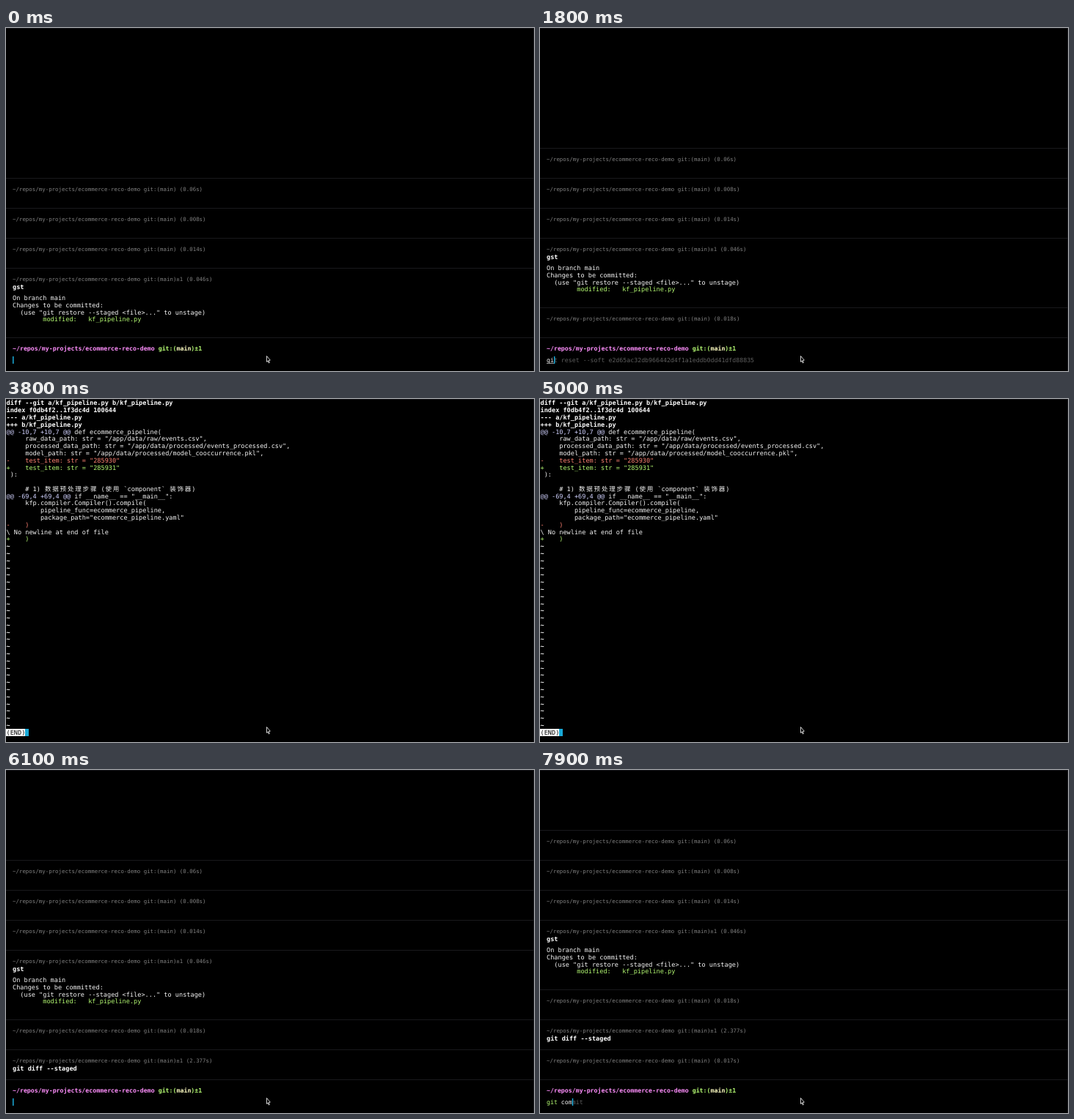
These frames come from a looping animation (720 by 469 pixels, 8 s). An HTML page with a canvas:

```html
<!DOCTYPE html>
<html lang="en">
<head>
<meta charset="utf-8">
<title>Terminal</title>
<style>
  html, body { margin: 0; width: 100%; height: 100%; overflow: hidden; background: #000; }
  canvas { display: block; }
</style>
</head>
<body>
<canvas id="stage" width="720" height="469"></canvas>
<script>
const ctx = document.getElementById('stage').getContext('2d');
const W = 720, H = 469, LOOP = 8000;
const LEFT = 9, PROMPT_TOP = 423, BLOCK_H = 41, ROW_H = 9.79;
const SMALL = 7.42, EDIT = 8.25, BODY = 8.57, ADVANCE = 0.602;
const PATH = '~/repos/my-projects/ecommerce-reco-demo';

const C = {
  text: '#f6f6f6', bold: '#ffffff', dim: '#808080', ghost: '#5e5e5e',
  path: '#ff8ffd', green: '#b4fa72', branch: '#fefdc2', del: '#ff8272',
  hunk: '#d0d1fe', arg: '#a5d5fe', rule: '#19191c', edge: '#121216',
  caret: '#19aad8', underline: '#a0a0a0'
};

const BLOCKS = [
  { time: '0.06s' },
  { time: '0.008s' },
  { time: '0.014s' },
  { time: '0.046s', dirty: true, cmd: 'gst', height: 95, out: [
    'On branch main',
    'Changes to be committed:',
    '  (use "git restore --staged <file>..." to unstage)',
    '        modified:   kf_pipeline.py'
  ] },
  { time: '0.018s' },
  { time: '2.377s', dirty: true, cmd: 'git diff --staged' },
  { time: '0.017s' }
];

const DIFF = `diff --git a/kf_pipeline.py b/kf_pipeline.py
index f0db4f2..1f3dc4d 100644
--- a/kf_pipeline.py
+++ b/kf_pipeline.py
@@ -10,7 +10,7 @@ def ecommerce_pipeline(
     raw_data_path: str = "/app/data/raw/events.csv",
     processed_data_path: str = "/app/data/processed/events_processed.csv",
     model_path: str = "/app/data/processed/model_cooccurrence.pkl",
-    test_item: str = "285930"
+    test_item: str = "285931"
 ):

     # 1) 数据预处理步骤 (使用 \`component\` 装饰器)
@@ -69,4 +69,4 @@ if __name__ == "__main__":
     kfp.compiler.Compiler().compile(
         pipeline_func=ecommerce_pipeline,
         package_path="ecommerce_pipeline.yaml"
-    )
\\ No newline at end of file
+    )`.split('\n');

const RESET = 'git reset --soft e2d65ac32db966442d4f1a1eddb0dd41dfd88835';
const STAGED = 'git diff --staged';
const COMMIT = 'git commit';

// Each event: time, finished blocks, typed length, suggested line.
const EVENTS = [
  [0, 4, 0, ''],
  [900, 5, 0, ''],
  [1700, 5, 1, RESET], [1800, 5, 2, RESET], [1900, 5, 3, RESET], [2000, 5, 4, RESET],
  [2200, 5, 5, STAGED], [2300, 5, 6, STAGED], [2400, 5, 7, STAGED], [2500, 5, 8, STAGED],
  [2700, 5, 9, STAGED], [2900, 5, 17, STAGED],
  [3800, 'pager'],
  [5900, 6, 0, ''], [6100, 6, 0, ''],
  [6900, 7, 0, ''],
  [7300, 7, 1, STAGED], [7400, 7, 2, STAGED], [7500, 7, 3, STAGED], [7600, 7, 4, STAGED],
  [7700, 7, 5, COMMIT], [7800, 7, 6, COMMIT], [7900, 7, 7, COMMIT]
];

function rect(x, y, w, h, color) {
  ctx.fillStyle = color;
  ctx.fillRect(x, y, w, h);
}

// Writes on a terminal grid; CJK characters take two cells. Returns the end x.
function write(text, x, y, size, color, bold) {
  const cell = size * ADVANCE;
  ctx.font = `${bold ? 'bold ' : ''}${size}px "DejaVu Sans Mono", "Noto Sans CJK SC", "Noto Sans CJK", monospace`;
  ctx.fillStyle = color;
  for (const ch of text) {
    const wide = ch > '\u2e80';
    if (ch !== ' ') ctx.fillText(ch, x + (wide ? cell - size / 2 : 0), y);
    x += wide ? cell * 2 : cell;
  }
  return x;
}

function drawBlock(block, top) {
  rect(0, top, W, 1, C.rule);
  write(`${PATH} git:(main)${block.dirty ? '±1' : ''} (${block.time})`, LEFT, top + 17.5, SMALL, C.dim);
  if (block.cmd) write(block.cmd, LEFT, top + 28.8, BODY, C.bold, true);
  (block.out || []).forEach((line, i) => {
    const color = line.includes('modified') ? C.green : C.text;
    write(line, LEFT, top + 44 + i * ROW_H, BODY, color);
  });
}

function drawInput(count, line, caretOn) {
  const y = 456.6, cell = EDIT * ADVANCE;
  const typed = line.slice(0, count);
  const caretX = LEFT + count * cell;
  const known = count >= 3;
  const argColor = typed.startsWith('git diff') ? C.arg : C.text;
  const x = write(typed.slice(0, 3), LEFT, y, EDIT, known ? C.green : C.text);
  write(typed.slice(3), x, y, EDIT, argColor);
  if (count && !known) rect(LEFT, 458, count * cell, 1, C.underline);
  write(line.slice(count), caretX, y, EDIT, C.ghost);
  if (caretOn) rect(caretX, 449, 1.5, 10, C.caret);
}

function drawShell(blocks, count, line, caretOn) {
  let top = PROMPT_TOP;
  rect(0, top, W, 1, C.rule);
  for (let i = blocks - 1; i >= 0; i--) {
    top -= BLOCKS[i].height || BLOCK_H;
    drawBlock(BLOCKS[i], top);
  }
  let x = write(PATH + ' ', LEFT, 441.3, EDIT, C.path, true);
  x = write('git:(', x, 441.3, EDIT, C.green, true);
  x = write('main', x, 441.3, EDIT, C.branch, true);
  write(')±1', x, 441.3, EDIT, C.green, true);
  drawInput(count, line, caretOn);
}

function drawPager() {
  const base = row => 8.4 + row * ROW_H;
  DIFF.forEach((line, row) => {
    const y = base(row);
    if (row < 4) {
      write(line, 0.5, y, BODY, C.bold, true);
    } else if (line.startsWith('@@')) {
      const end = line.indexOf('@@', 2) + 2;
      const x = write(line.slice(0, end), 0.5, y, BODY, C.hunk);
      write(line.slice(end), x, y, BODY, C.text);
    } else {
      write(line, 0.5, y, BODY, { '-': C.del, '+': C.green }[line[0]] || C.text);
    }
  });
  for (let row = DIFF.length; row < 46; row++) write('~', 0.5, base(row), BODY, C.bold, true);
  rect(0, 451, 26, 10, C.bold);
  rect(26, 451, 5, 10, C.caret);
  write('(END)', 0.5, base(46), BODY, '#000');
}

function drawPointer() {
  ctx.beginPath();
  [[355.5, 448.5], [355.5, 456.5], [357.2, 455], [358.2, 458], [359.4, 457.5], [358.3, 454.6], [360.3, 454.2]]
    .forEach(([x, y]) => ctx.lineTo(x, y));
  ctx.closePath();
  ctx.fillStyle = '#000';
  ctx.fill();
  ctx.lineWidth = 0.9;
  ctx.strokeStyle = '#e4e4e4';
  ctx.stroke();
}

function draw(t) {
  const [start, blocks, count, line] = EVENTS.filter(e => e[0] <= t).pop();
  rect(0, 0, W, H, '#000');
  rect(0, 0, W, 1, C.edge);
  rect(W - 1, 0, 1, H, C.edge);
  if (blocks === 'pager') drawPager();
  else drawShell(blocks, count, line, (t - start) % 1000 < 500);
  drawPointer();
}

ctx.textRendering = 'geometricPrecision';
const began = performance.now();
function tick() {
  draw((performance.now() - began) % LOOP);
  requestAnimationFrame(tick);
}
tick();
</script>
</body>
</html>
```
